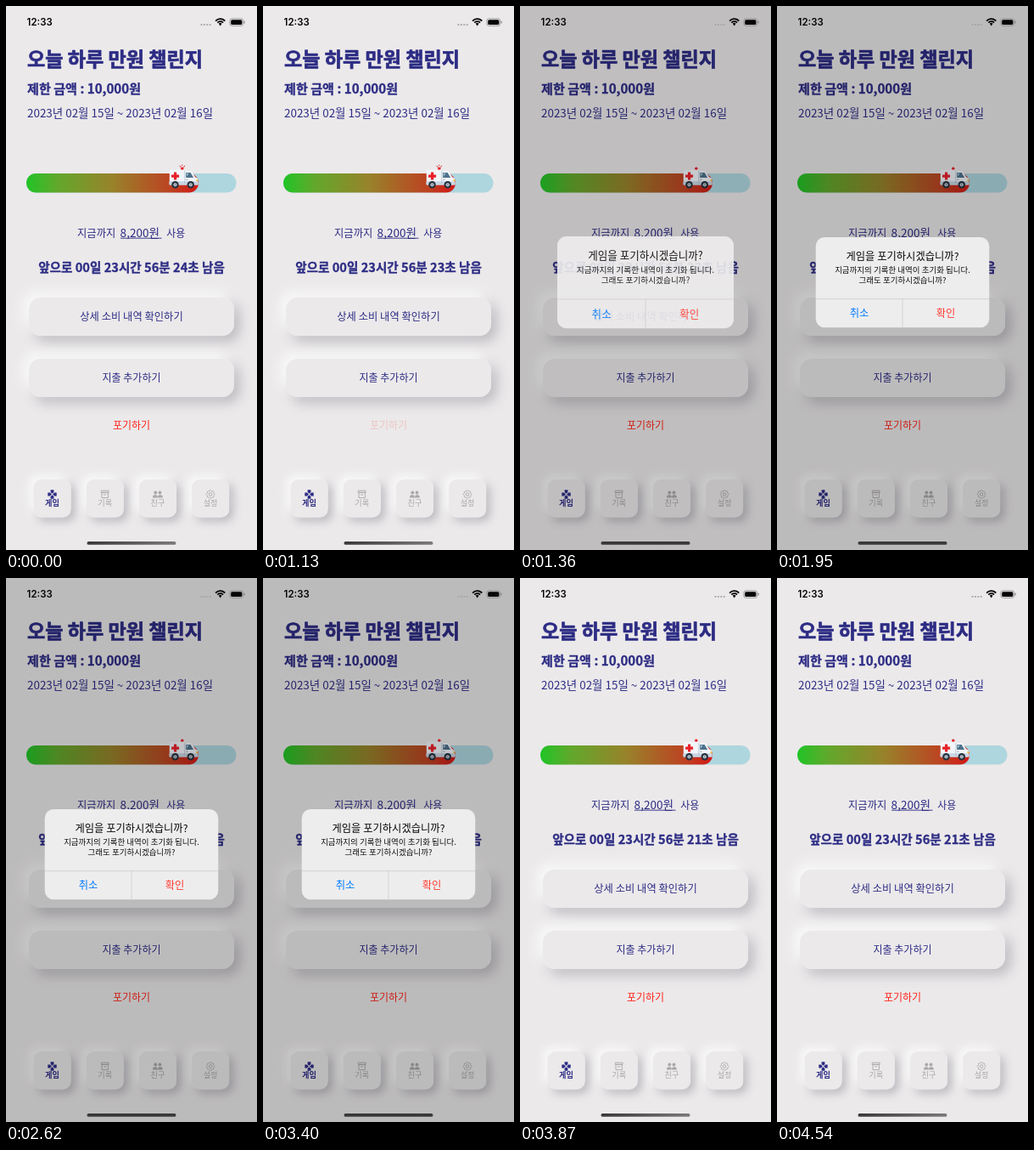
Recreate the animation shown at these times as an HTML page with a canvas. Size 296 px wide and 640 px high, loop 4.59 s.

```html
<!DOCTYPE html>
<html lang="ko">
<head>
<meta charset="utf-8">
<title>만원 챌린지</title>
<style>
  html, body { margin: 0; width: 100%; height: 100%; overflow: hidden; background: #ebe9ea; }
  canvas { display: block; width: 296px; height: 640px; }
</style>
</head>
<body>
<canvas id="stage"></canvas>
<script>
const W = 296, H = 640, LOOP = 4590;
const STEP = 113.5, LEAD = 12;           // the screen refreshes about nine times a second
const BG = '#ebe9ea', NAVY = '#2d2c84', GREY = '#a9a8aa', RED = '#ff2218';
const KR = '"Noto Sans CJK KR", "Noto Sans KR", "Noto Sans CJK", sans-serif';
const UI = 'Inter, "Liberation Sans", sans-serif';

const canvas = document.getElementById('stage');
const c = canvas.getContext('2d');
const dpr = window.devicePixelRatio || 1;
canvas.width = W * dpr;
canvas.height = H * dpr;

const clamp = v => Math.max(0, Math.min(1, v));

function text(str, x, cy, size, weight, color, align = 'left', family = KR) {
  c.font = `${weight} ${size}px ${family}`;
  c.textAlign = align;
  c.fillStyle = color;
  c.fillText(str, x, cy + size * 0.37);
}

// Heading with a round outline that thickens and softens the letters
function heading(str, x, cy, size, outline, align = 'left') {
  text(str, x, cy, size, 700, NAVY, align);
  c.strokeStyle = NAVY;
  c.lineWidth = outline;
  c.lineJoin = 'round';
  c.strokeText(str, x, cy + size * 0.37);
}

function box(x, y, w, h, r, fill) {
  c.beginPath();
  c.roundRect(x, y, w, h, r);
  c.fillStyle = fill;
  c.fill();
}

function disc(x, y, r, fill) {
  c.beginPath();
  c.arc(x, y, r, 0, Math.PI * 2);
  c.fillStyle = fill;
  c.fill();
}

function poly(points, fill) {
  c.beginPath();
  points.forEach(([x, y]) => c.lineTo(x, y));
  c.closePath();
  c.fillStyle = fill;
  c.fill();
}

function line(x1, y1, x2, y2, color, width) {
  c.beginPath();
  c.moveTo(x1, y1);
  c.lineTo(x2, y2);
  c.strokeStyle = color;
  c.lineWidth = width;
  c.stroke();
}

function across(x1, x2, stops) {
  const grad = c.createLinearGradient(x1, 0, x2, 0);
  stops.forEach(([at, color]) => grad.addColorStop(at, color));
  return grad;
}

// Soft raised panel: dark shadow below right, light one above left
function raised(x, y, w, h, r, depth) {
  c.save();
  for (const [dir, color] of [[1, 'rgba(110,108,118,.42)'], [-1, 'rgba(255,255,255,.85)']]) {
    c.shadowColor = color;
    c.shadowOffsetX = c.shadowOffsetY = dir * depth * dpr;
    c.shadowBlur = depth * 2.4 * dpr;
    box(x, y, w, h, r, BG);
  }
  c.restore();
}

function statusBar() {
  text('12:33', 24.6, 19, 11.4, 600, '#050505', 'left', UI);
  for (let i = 0; i < 4; i++) disc(230.5 + i * 3.4, 22, 1.1, '#a5a3a5');
  c.strokeStyle = '#050505';
  c.lineWidth = 1.8;
  for (const r of [4.6, 7.6]) {
    c.beginPath();
    c.arc(252.7, 22.8, r, -Math.PI * 0.76, -Math.PI * 0.24);
    c.stroke();
  }
  c.beginPath();
  c.moveTo(252.7, 23.6);
  c.arc(252.7, 22.4, 2.4, -Math.PI * 0.78, -Math.PI * 0.22);
  c.fillStyle = '#050505';
  c.fill();
  c.beginPath();
  c.roundRect(263.9, 14.9, 15.8, 8.4, 2.5);
  c.strokeStyle = '#89878a';
  c.lineWidth = 0.8;
  c.stroke();
  box(265.2, 16.2, 13.2, 5.8, 1.5, '#050505');
  box(280.6, 17.6, 1.1, 3, 0.6, '#89878a');
}

function ambulance(t) {
  const siren = '#e8202a', body = '#f1f5fa', shade = '#c9d7e6', dark = '#26323f';
  if (t < 1200) {
    line(205, 187.8, 206.2, 189.8, siren, 1);
    line(207.8, 186.6, 207.8, 188.2, siren, 0.9);
    line(210.8, 187.8, 209.5, 189.8, siren, 1);
  }
  disc(207.8, 191.3, 1.7, siren);
  box(192.8, 192.8, 18.2, 17, 1.6, body);
  poly([[210, 194], [218.5, 194], [223, 201], [226, 203], [226.5, 210], [210, 210]], body);
  box(192.4, 206.2, 34.2, 4.6, 1.2, shade);
  poly([[212.2, 196], [217.6, 196], [221.2, 202], [212.2, 202]], '#4d7189');
  poly([[213, 196.8], [215.6, 196.8], [213, 200.4]], '#9fc4d6');
  line(210.8, 194, 210.8, 209, '#aab9c8', 0.7);
  line(212.4, 204.2, 214.4, 204.2, '#75889a', 0.8);
  box(224.2, 204, 2.2, 2.2, 0.8, '#f4c94b');
  box(198, 195.6, 3.2, 9, 0.3, siren);
  box(195.1, 198.5, 9, 3.2, 0.3, siren);
  for (const x of [199.5, 217.8]) {
    disc(x, 210.3, 4.2, dark);
    disc(x, 210.3, 2.1, '#c3ccd4');
    disc(x, 210.3, 0.9, '#70808e');
  }
}

function progress(t) {
  box(24, 197, 247.5, 22.5, 11.25, '#aed6df');
  box(24, 197, 203, 22.5, 11.25, across(24, 227, [
    [0, 'rgb(32,196,38)'], [0.18, 'rgb(98,168,44)'], [0.5, 'rgb(152,130,42)'],
    [0.83, 'rgb(188,68,34)'], [1, 'rgb(212,24,22)']
  ]));
  ambulance(t);
}

const icons = {
  pad(x, y) {
    for (let i = 0; i < 4; i++) {
      c.save();
      c.translate(x, y);
      c.rotate(i * Math.PI / 2);
      poly([[0, -0.7], [-1.9, -2.5], [-1.9, -5.2], [1.9, -5.2], [1.9, -2.5]], NAVY);
      c.restore();
    }
  },
  archive(x, y) {
    c.strokeStyle = GREY;
    c.lineWidth = 0.9;
    c.strokeRect(x - 4.4, y - 4.3, 8.8, 2.2);
    c.strokeRect(x - 3.7, y - 2.1, 7.4, 6.2);
    line(x - 1.5, y + 0.4, x + 1.5, y + 0.4, GREY, 0.9);
  },
  people(x, y) {
    for (const dx of [-2.6, 2.6]) {
      disc(x + dx, y - 2, 1.9, GREY);
      c.beginPath();
      c.roundRect(x + dx * 1.15 - 2.9, y + 0.8, 5.8, 3.2, [2.4, 2.4, 0, 0]);
      c.fill();
    }
  },
  gear(x, y) {
    c.beginPath();
    for (let i = 0; i <= 64; i++) {
      const a = i / 64 * Math.PI * 2, r = 4.4 + 0.45 * Math.cos(a * 8);
      c.lineTo(x + r * Math.cos(a), y + r * Math.sin(a));
    }
    c.strokeStyle = GREY;
    c.lineWidth = 0.9;
    c.stroke();
    c.beginPath();
    c.arc(x, y, 1.8, 0, Math.PI * 2);
    c.stroke();
  }
};

function tabs() {
  [['게임', 'pad'], ['기록', 'archive'], ['친구', 'people'], ['설정', 'gear']].forEach(([label, icon], i) => {
    const x = 32.5 + i * 62.2, active = i === 0;
    raised(x, 557, 44, 44.5, 9, 4.5);
    icons[icon](x + 22, 574.5);
    text(label, x + 22, 584.8, 9.2, active ? 700 : 400, active ? NAVY : GREY, 'center');
  });
}

// Press dims the label, release restores it
function pressAlpha(t) {
  const down = clamp((t - 880) / 150), up = clamp((t - 1150) / 190);
  return 1 - 0.82 * down * (1 - up);
}

function screen(t) {
  c.fillStyle = BG;
  c.fillRect(0, 0, W, H);

  heading('오늘 하루 만원 챌린지', 25, 62, 23.1, 0.7);
  heading('제한 금액 : 10,000원', 25, 97, 15.1, 0.3);
  text('2023년 02월 15일 ~ 2023년 02월 16일', 25, 125.6, 13.45, 400, NAVY);

  progress(t);

  text('지금까지', 84, 267, 12.3, 400, NAVY);
  text('8,200원', 134.6, 267, 13.6, 400, NAVY);
  line(135, 273.2, 183.5, 273.2, NAVY, 0.9);
  text('사용', 189.2, 267.4, 12, 400, NAVY);

  const left = 24 - [1080, 2100, 3120].filter(tick => t >= tick).length;
  heading(`앞으로 00일 23시간 56분 ${left}초 남음`, 148, 307.3, 14.6, 0.3, 'center');

  raised(27, 343, 242, 45, 14, 6);
  text('상세 소비 내역 확인하기', 148, 365, 12.3, 500, NAVY, 'center');
  raised(27, 415, 242, 45, 14, 6);
  text('지출 추가하기', 148, 437.2, 12, 500, NAVY, 'center');

  c.globalAlpha = pressAlpha(t);
  text('포기하기', 148, 494, 12, 500, RED, 'center');
  c.globalAlpha = 1;

  tabs();
}

// Returns how visible the dialog is
function dialog(t) {
  const rest = t > 1190 ? Math.exp((1190 - t) / 70) : 1;
  const fade = t > 3420 ? Math.exp((3420 - t) / 90) : 1;
  const alpha = (1 - rest) * fade;
  if (alpha < 0.01) return 0;

  c.fillStyle = `rgba(0,0,0,${0.2 * alpha})`;
  c.fillRect(0, 0, W, H);

  c.save();
  c.globalAlpha = alpha;
  c.translate(148, 325);
  c.scale(1 + 0.2 * rest, 1 + 0.2 * rest);
  c.translate(-148, -325);
  box(45.7, 272, 204.6, 106.3, 10.5, '#eeedee');
  text('게임을 포기하시겠습니까?', 148, 294, 12.3, 500, '#080808', 'center');
  text('지금까지의 기록한 내역이 초기화 됩니다.', 148, 310.2, 9.5, 400, '#101010', 'center');
  text('그래도 포기하시겠습니까?', 148, 322.4, 9.5, 400, '#101010', 'center');
  line(45.7, 344.6, 250.3, 344.6, '#c9c8ca', 0.7);
  line(148, 344.6, 148, 378.3, '#c9c8ca', 0.7);
  text('취소', 97, 361.4, 12.3, 500, '#007aff', 'center');
  text('확인', 199, 361.4, 12.3, 400, '#ff3b30', 'center');
  c.restore();
  return alpha;
}

// The home bar pales to the right unless the screen is dimmed
function homeBar(dim) {
  const pale = 57 + 65 * (1 - clamp(dim * 3));
  box(95.5, 630, 105, 3.8, 1.9, across(95, 200, [[0, '#39383a'], [1, `rgb(${pale},${pale},${pale})`]]));
}

function draw(now) {
  const t = Math.floor((now % LOOP + LEAD) / STEP) * STEP;
  c.setTransform(dpr, 0, 0, dpr, 0, 0);
  screen(t);
  const dim = dialog(t);
  statusBar();
  homeBar(dim);
}

let start;
function loop(now) {
  start ??= now;
  draw(now - start);
  requestAnimationFrame(loop);
}
draw(0);
requestAnimationFrame(loop);
</script>
</body>
</html>
```
